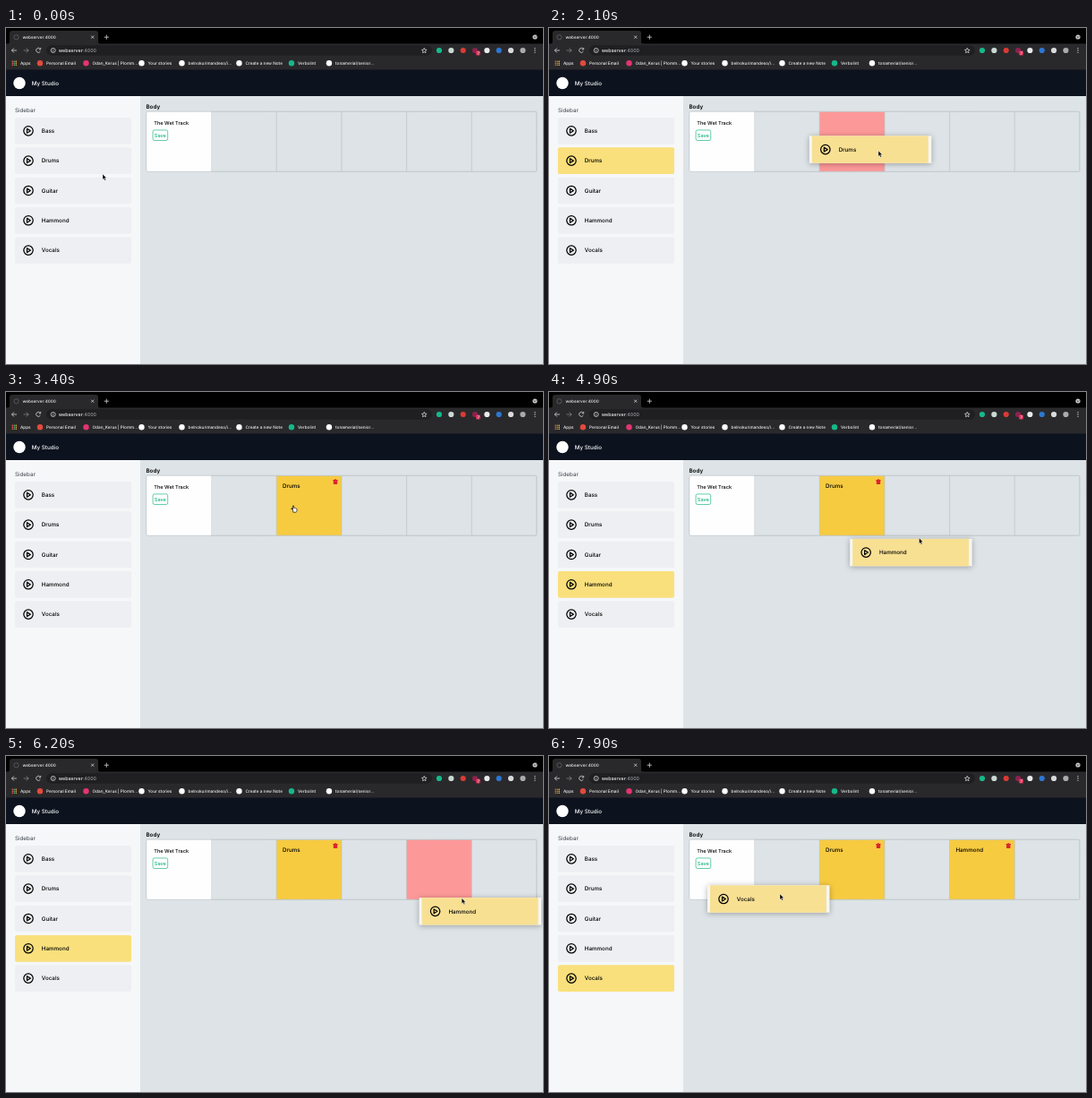
Animation of 600 by 375 pixels, one loop 8000 ms. Source, as an HTML page:

```html
<!DOCTYPE html>
<html lang="en">
<head>
<meta charset="utf-8">
<title>My Studio</title>
<style>
  html, body { margin: 0; width: 100%; height: 100%; overflow: hidden; background: #dde3e6; }
  svg { display: block; width: 600px; height: 375px; }
  text { font: 500 6.25px Inter, "Open Sans", sans-serif; fill: #000; text-rendering: geometricPrecision; }
  .chrome text { font-size: 4.7px; fill: #f0f0f1; }
  .chrome .url { font-size: 5.3px; }
  .line { fill: none; stroke: #d5d7da; stroke-width: .8; }
  .cell { stroke: #b9c0c4; stroke-width: .5; stroke-dasharray: 1.3 .5; }
  .small { font-size: 5.6px; }
  #ghost { filter: drop-shadow(0 1.5px 3px rgba(0, 0, 0, .3)); }
</style>
</head>
<body>
<svg id="stage" viewBox="0 0 600 375"></svg>
<script>
const LOOP = 8000, STEP = 100, LAG = 50;
const TRACKS = ['Bass', 'Drums', 'Guitar', 'Hammond', 'Vocals'];
const CELLS = [1, 2, 3, 4, 5];
const CELL_W = 72.65, CARD_H = 29.7;
const cardY = i => 100 + i * 33.33;
const cellX = i => 157 + i * CELL_W;

// Pointer stops: time, x, y; it eases from one to the next
const STOPS = [
  [0, 108, 163], [400, 108, 163], [700, 84, 150], [1000, 84, 150],
  [1400, 210, 178], [1800, 366, 138], [2100, 368, 137], [2600, 345, 134],
  [3400, 321, 127], [4400, 58, 208], [4700, 245, 220], [4900, 413.5, 163],
  [5200, 507, 140], [5650, 438, 114], [6000, 518, 178], [6500, 493, 123],
  [6900, 490, 125], [7450, 88, 243], [7850, 258, 154], [LOOP, 258, 154]
];

const DRAGS = [
  { track: 1, from: 1000, to: 2600, cell: 2 },
  { track: 3, from: 4400, to: 6900, cell: 4 },
  { track: 4, from: 7450, to: LOOP }
];

const rect = (x, y, w, h, fill, more = '') =>
  `<rect x="${x}" y="${y}" width="${w}" height="${h}" fill="${fill}" ${more}/>`;
const dot = (x, y, r, fill) => `<circle cx="${x}" cy="${y}" r="${r}" fill="${fill}"/>`;
const text = (x, y, s, more = '') => `<text x="${x}" y="${y}" ${more}>${s}</text>`;
const line = (d, more = '') => `<path class="line" d="${d}" ${more}/>`;
const each = (list, fn) => list.map(fn).join('');
const play = (x, y) => `<g transform="translate(${x} ${y})" fill="none" stroke="#000" stroke-width="1.25" stroke-linejoin="round">
  <circle r="5.2"/><path d="M-1.5-2.4 2.3 0-1.5 2.4Z"/></g>`;

function browser() {
  const marks = [
    ['Personal Email', 45, '#e34a3f'], ['Odan_Kerus | Plomm...', 96.5, '#e2356f'],
    ['Your stories', 158.5, '#fff'], ['belnokurimandeso/i...', 203.5, '#fff'],
    ['Create a new Note', 267.5, '#fff'], ['Verbolint', 326, '#16b88a'],
    ['tonamerial/senior...', 368, '#fff']
  ];
  const tools = ['#16b88a', '#cbd9d5', '#d93a34', '#8d214c', '#e9e9e9', '#2d76d2', '#d9dadc', '#a9aba9'];
  const grid = [0, 1, 2];
  return `<g class="chrome">
    ${rect(0, 0, 600, 18, '#000')}${rect(0, 17.5, 600, 29, '#29292b')}
    <path d="M1 18Q4 18 4 15V6Q4 3 7 3H100Q103 3 103 6V15Q103 18 106 18Z" fill="#29292b"/>
    ${line('M95.2 8.7l3 3m0-3l-3 3M112.3 7.6v5.2m-2.6-2.6h5.2')}
    <circle class="line" cx="11.5" cy="10.3" r="2.6" opacity=".3"/>
    ${text(18.5, 12.2, 'webserver:4000')}
    ${dot(591, 10, 2.6, '#c4c5c7')}${line('M589.8 9.5l1.2 1.2 1.2-1.2', 'style="stroke:#111"')}
    ${line('M12 25H6.4m2.5-2.5L6.4 25l2.5 2.5')}
    ${line('M19.6 25h5.6m-2.5-2.5l2.5 2.5-2.5 2.5', 'opacity=".5"')}
    ${line('M38.2 23.4A2.5 2.5 0 1 0 38.4 26M38.7 21.9v2h-2')}
    ${rect(45, 19.3, 431, 11.4, '#1f1f21', 'rx="5.7"')}
    <circle class="line" cx="52.7" cy="25" r="2.5"/>${line('M52.7 24.7v1.7m0-2.9v.5')}
    <text class="url" x="58.8" y="27">webserver<tspan fill="#9a9da1">:4000</tspan></text>
    ${line('M467.3 22.4l.8 1.8 2 .2-1.5 1.3.4 2-1.7-1-1.7 1 .4-2-1.5-1.3 2-.2Z')}
    ${each(tools, (c, i) => dot(484 + i * 13.35, 25, 3.1, c))}
    ${rect(525, 25.5, 5, 5, '#d32f55', 'rx="1"')}${text(526.2, 29.7, '7')}
    ${each(grid, i => dot(591, 22.7 + i * 2.3, .65, '#d5d7da'))}
    ${each(grid, r => each(grid, c => rect(6.6 + c * 2, 36.6 + r * 2, 1.4, 1.4, ['#e5534b', '#4fa865', '#e6a13c'][c])))}
    ${text(16, 41, 'Apps')}
    ${each(marks, ([s, x, c]) => dot(x - 7, 39.2, 3.2, c) + text(x, 41, s))}
  </g>`;
}

const card = (name, i) => rect(10, cardY(i), 130, CARD_H, '#eeeff2', `rx="2" id="card${i}"`) +
  play(25, cardY(i) + 14.8) + text(39.8, cardY(i) + 17, name);

const clip = ({ track, cell }) => `<g id="clip${cell}" transform="translate(${cellX(cell)} 100)">
  ${text(6.8, 7.4, TRACKS[track])}
  <path transform="translate(65.7)" fill="#dc2430" d="M-2.7-2h1.6l.5-.8H.6l.5.8h1.6v.9h-.5V2.2q0 .7-.7.7h-3q-.7 0-.7-.7v-3.3h-.5Z"/></g>`;

const app = () => `
  ${rect(0, 76, 600, 299, '#dde3e6')}${rect(0, 76, 150, 299, '#f5f7f9')}
  ${rect(0, 46, 600, 30, '#0c121e')}${dot(15, 61.5, 6.7, '#fff')}
  ${text(28.8, 63.9, 'My Studio', 'style="fill:#fff"')}
  ${text(10, 93.8, 'Sidebar', 'style="fill:#3a3f47;font-weight:400"')}
  ${text(156.5, 90.4, 'Body', 'style="font-weight:600"')}
  ${each(TRACKS, card)}
  ${rect(157, 93.3, CELL_W, 66.9, '#fefefe', 'rx="1.5"')}
  ${each(CELLS, i => rect(cellX(i), 93.4, CELL_W, 66.8, 'none', `class="cell" id="cell${i}"`))}
  ${rect(156.8, 93.2, 436, 67.1, 'none', 'rx="2" stroke="#bbc2c6" stroke-width=".65"')}
  ${text(165.3, 107.8, 'The Wet Track', 'class="small"')}
  ${rect(164.1, 113.9, 16.6, 11.6, '#fff', 'rx="1.8" stroke="#10b27c" stroke-width=".65"')}
  ${text(165.8, 121.8, 'Save', 'class="small" style="fill:#10b27c"')}
  ${each(DRAGS.filter(d => d.cell), clip)}`;

const overlay = `
  <g id="ghost">${rect(0, 0, 136.5, 30.4, '#f6f6f4')}${rect(3, 0, 130, 30.4, '#f8e093')}
    ${play(18, 15.2)}<text id="label" x="32.8" y="17.4"></text></g>
  <path id="arrow" d="M0 0V6.2L1.4 4.9 2.4 7.2 3.5 6.7 2.5 4.5H4.4Z" stroke="#fff" stroke-width=".4"/>
  <path id="hand" d="M-.6 0Q0-.8.6 0V2.4Q1.5 2 1.9 2.7 2.8 2.4 3.1 3.1 4 3 4 3.8V5.2Q3.8 6.5 3.2 7.2H-.2Q-1-.1-2.3 4-2.2 3.2-1.4 3.5L-.6 4.2Z" fill="#fff" stroke="#111" stroke-width=".7" stroke-linejoin="round"/>`;

document.getElementById('stage').innerHTML = app() + browser() + overlay;
const $ = id => document.getElementById(id);
const show = (id, on) => { $(id).style.display = on ? '' : 'none'; };
const place = (id, x, y) => $(id).setAttribute('transform', `translate(${x} ${y})`);
const paint = (id, color) => $(id).setAttribute('fill', color);

function pointer(t) {
  const i = Math.max(1, STOPS.findIndex(p => p[0] >= t));
  const [t0, x0, y0] = STOPS[i - 1], [t1, x1, y1] = STOPS[i];
  const k = (t - t0) / (t1 - t0), ease = k * k * (3 - 2 * k);
  return [x0 + (x1 - x0) * ease, y0 + (y1 - y0) * ease];
}

function draw(t) {
  const [x, y] = pointer(t);
  const drag = DRAGS.find(d => t >= d.from && t < d.to);
  const over = y > 93 && y < 160 ? Math.floor((x - 157) / CELL_W) : -1;
  const filled = DRAGS.filter(d => t >= d.to).map(d => d.cell);

  TRACKS.forEach((_, i) => paint('card' + i, drag && drag.track === i ? '#f9e07c' : '#eeeff2'));
  CELLS.forEach(i => paint('cell' + i,
    filled.includes(i) ? '#f7cb40' : drag && over === i && i > 1 ? '#fd9898' : 'none'));
  DRAGS.filter(d => d.cell).forEach(d => show('clip' + d.cell, t >= d.to));

  // The dragged card trails the pointer a little
  show('ghost', drag);
  if (drag) {
    const [gx, gy] = pointer(drag.from);
    const [lx, ly] = pointer(Math.max(drag.from, t - LAG));
    place('ghost', lx - gx + 7, ly - gy + cardY(drag.track));
    $('label').textContent = TRACKS[drag.track];
  }

  const hover = !drag && filled.includes(over);
  show('hand', hover);
  show('arrow', !hover);
  place(hover ? 'hand' : 'arrow', x, y);
}

const start = performance.now();
function frame() {
  const t = (performance.now() - start) % LOOP;
  draw(Math.floor(t / STEP) * STEP);
  requestAnimationFrame(frame);
}
frame();
</script>
</body>
</html>
```
